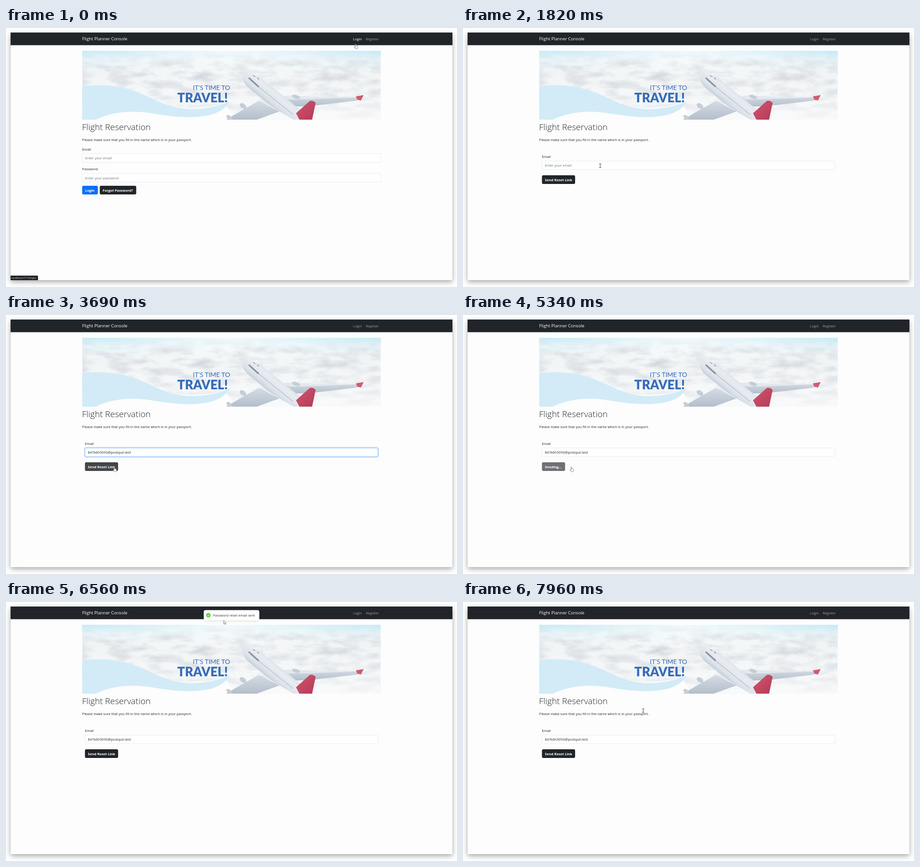
An HTML page that plays this animation: 986x568 px, repeating every 8 s.

```html
<!DOCTYPE html>
<html lang="en">
<head>
<meta charset="utf-8">
<title>Flight reservation</title>
<style>
html, body { margin: 0; width: 100%; height: 100%; overflow: hidden; background: #fff; }
.window { position: absolute; left: 10px; top: 10px; width: 966px; height: 543px; background: #fdfdfd; box-shadow: 0 4px 11px rgba(0,0,0,.34), 0 0 2px rgba(0,0,0,.12); }
svg { position: absolute; left: 0; top: 0; width: 986px; height: 568px; }
text { font: 7.6px "Open Sans", "Noto Sans", sans-serif; fill: #212529; white-space: pre; }
.brand { font-size: 9.5px; fill: #fff; }
.title { font-size: 18.9px; font-weight: 300; }
.hint { fill: #6c7277; }
.status { font-size: 5.76px; fill: #d6d7d9; }
.bold { font-weight: 700; fill: #fff; }
.slogan { font-family: Lato, sans-serif; fill: #356cb9; }
.field { fill: #fff; stroke: #dee2e6; stroke-width: .7; }
.dark { fill: #212529; }
.anim { animation: 8s step-end infinite; }

/* Pages */
#login { animation-name: login; }
@keyframes login { 0% { opacity: 1 } 15.9%, to { opacity: 0 } }
#forgot { animation-name: forgot; }
@keyframes forgot { 0% { opacity: 0 } 15.9%, to { opacity: 1 } }
#nav { animation-name: nav; animation-timing-function: linear; }
@keyframes nav { 0%, 15.9% { fill-opacity: 1 } 17.8%, to { fill-opacity: .55 } }
#forgotBtn { animation-name: forgotBtn; animation-timing-function: linear; }
@keyframes forgotBtn { 0%, 10.4% { fill: #212529 } 12.6%, to { fill: #424649 } }

/* Link bubble */
#tipLogin { animation-name: tipLogin; }
@keyframes tipLogin { 0% { opacity: 1 } 9.9%, to { opacity: 0 } }
#tipForgot { animation-name: tipForgot; animation-timing-function: linear; }
@keyframes tipForgot { 0%, 9.89% { opacity: 0 } 9.9%, 17.5% { opacity: 1 } 19.5%, to { opacity: 0 } }

/* Email field */
#focus { animation-name: focus; animation-timing-function: linear; }
@keyframes focus { 0%, 23.2% { opacity: 0 } 25%, 46.9% { opacity: 1 } 48.6%, to { opacity: 0 } }
#hint { animation-name: hint; }
@keyframes hint { 0% { opacity: 1 } 33.6%, to { opacity: 0 } }
#email { animation-name: email; }
@keyframes email { 0% { opacity: 0 } 33.6%, to { opacity: 1 } }
#caretA { animation-name: caretA; }
@keyframes caretA { 0% { opacity: 0 } 24% { opacity: 1 } 30.2%, to { opacity: 0 } }
#caretB { animation-name: caretB; }
@keyframes caretB { 0% { opacity: 0 } 33.6% { opacity: 1 } 39.8%, to { opacity: 0 } }

/* Send button */
#send { animation-name: send; }
@keyframes send { 0% { opacity: 1 } 47% { opacity: 0 } 67.6%, to { opacity: 1 } }
#sending { animation-name: sending; }
@keyframes sending { 0% { opacity: 0 } 47% { opacity: .65 } 67.6%, to { opacity: 0 } }
#sendBtn { animation-name: sendBtn; animation-timing-function: linear; }
@keyframes sendBtn { 0%, 42.2% { fill: #212529 } 44.1%, 75.6% { fill: #424649 } 77.5%, to { fill: #212529 } }

/* Toast */
#toast, #badge { transform-box: fill-box; transform-origin: center; }
#toast { animation-name: toast; filter: drop-shadow(0 1.5px 3px rgba(0,0,0,.13)); }
@keyframes toast {
  0% { opacity: 0; transform: translateY(-44px) scale(.6) }
  67.7% { opacity: .5; transform: translateY(-44px) scale(.6); animation-timing-function: cubic-bezier(.21,1.02,.73,1) }
  72.1% { opacity: 1; transform: none }
  92.7% { opacity: 1; transform: none; animation-timing-function: cubic-bezier(.06,.71,.55,1) }
  96%, to { opacity: 0; transform: translateY(-33px) scale(.6) }
}
#badge { animation-name: badge; }
@keyframes badge {
  0% { transform: scale(0) rotate(45deg) }
  68.4% { transform: scale(0) rotate(45deg); animation-timing-function: cubic-bezier(.175,.885,.32,1.275) }
  71.6%, to { transform: none }
}
#tick { stroke-dasharray: 8; animation-name: tick; animation-timing-function: ease-out; }
@keyframes tick { 0%, 70.4% { stroke-dashoffset: 8 } 72.8%, to { stroke-dashoffset: 0 } }

/* Pointer */
#pointer { animation-name: move; animation-timing-function: ease-in-out; }
@keyframes move {
  0%, .7% { transform: translate(764.3px,34.7px) }
  9.9%, 14.6% { transform: translate(245.5px,352.6px) }
  20.3% { transform: translate(289px,300px) }
  22%, 27.2% { transform: translate(300px,302px) }
  31% { transform: translate(365px,347px) }
  35.9%, 39.4% { transform: translate(264px,331px) }
  44.5%, 74.8% { transform: translate(236.8px,333px) }
  77% { transform: translate(252px,362px) }
  81.8% { transform: translate(475.8px,40.4px) }
  83.8%, 85.2% { transform: translate(477px,48.5px) }
  88.2% { transform: translate(397px,243px); animation-timing-function: step-end }
  99.4%, to { transform: translate(394px,238.3px) }
}
#hand { animation-name: hand; }
@keyframes hand { 0% { opacity: 1 } 1.8% { opacity: 0 } 9.7% { opacity: 1 } 16% { opacity: 0 } 41.8% { opacity: 1 } 76%, to { opacity: 0 } }
#arrow { animation-name: arrow; }
@keyframes arrow { 0% { opacity: 0 } 1.8% { opacity: 1 } 9.7% { opacity: 0 } 16% { opacity: 1 } 19.4% { opacity: 0 } 28.6% { opacity: 1 } 41.8% { opacity: 0 } 76% { opacity: 1 } 87.2%, to { opacity: 0 } }
#beam { animation-name: beam; }
@keyframes beam { 0% { opacity: 0 } 19.4% { opacity: 1 } 28.6% { opacity: 0 } 87.2%, to { opacity: 1 } }
</style>
</head>
<body>
<div class="window"></div>

<!-- Banner -->
<svg viewBox="0 0 986 568">
  <defs>
    <linearGradient id="sky" x2="0" y2="1">
      <stop stop-color="#c6eaf6"/><stop offset=".12" stop-color="#e6f4f8"/><stop offset=".3" stop-color="#f1f4f5"/><stop offset="1" stop-color="#f9fafb"/>
    </linearGradient>
    <radialGradient id="sun" cx=".5" cy="0" r=".5">
      <stop stop-color="#fff" stop-opacity=".75"/><stop offset="1" stop-color="#fff" stop-opacity="0"/>
    </radialGradient>
    <linearGradient id="fade" x2="0" y2="1">
      <stop stop-color="#fff" stop-opacity="0"/><stop offset=".25" stop-color="#fff"/><stop offset=".65" stop-color="#fff" stop-opacity=".8"/><stop offset="1" stop-color="#fff" stop-opacity=".1"/>
    </linearGradient>
    <linearGradient id="body" gradientUnits="userSpaceOnUse" x1="594" y1="132" x2="566" y2="166">
      <stop stop-color="#d9dfe6"/><stop offset=".3" stop-color="#e8ecf1"/><stop offset=".7" stop-color="#dde3ea"/><stop offset="1" stop-color="#bcc6d1"/>
    </linearGradient>
    <linearGradient id="wing" x2="0" y2="1">
      <stop stop-color="#d5dce4"/><stop offset="1" stop-color="#b3bfcb"/>
    </linearGradient>
    <linearGradient id="fin" x2="1" y2="1">
      <stop stop-color="#d0566f"/><stop offset="1" stop-color="#b53a56"/>
    </linearGradient>
    <filter id="cloud" x="0" y="0" width="1" height="1" color-interpolation-filters="sRGB">
      <feTurbulence type="fractalNoise" baseFrequency=".022 .06" numOctaves="4" seed="8"/>
      <feColorMatrix values="0 0 0 0 .78  0 0 0 0 .8  0 0 0 0 .83  1.5 0 0 0 -.58"/>
    </filter>
    <mask id="haze"><rect x="167" y="50" width="652" height="151" fill="url(#fade)"/></mask>
    <clipPath id="frame"><rect x="166.5" y="50" width="653" height="151"/></clipPath>
  </defs>
  <g clip-path="url(#frame)">
    <rect x="166" y="50" width="654" height="151" fill="url(#sky)"/>
    <rect x="166" y="50" width="654" height="151" fill="url(#sun)"/>
    <g mask="url(#haze)"><rect x="166" y="50" width="654" height="151" filter="url(#cloud)"/></g>
    <path fill="#fff" fill-opacity=".75" d="M166 128C220 120 270 130 318 154S395 180 480 168L500 201H166Z"/>
    <path fill="#d2ebf7" d="M166 128C220 120 270 130 318 154S400 182 448 174Q474 169 489 161Q479 180 452 189C408 201 360 194 318 187S235 183 196 201H166Z"/>
    <text class="slogan" x="408.5" y="135.5" style="font-size:14px">IT’S TIME TO</text>
    <text class="slogan" x="374.5" y="162.5" style="font-size:27.5px;font-weight:900">TRAVEL!</text>

    <!-- Plane -->
    <path fill="url(#wing)" d="M598 150C625 147 650 150 690 152L768 152L775 156L768 159L700 167Q650 174 626 171Z"/>
    <path fill="#e3e8ed" d="M598 150C625 147 650 150 690 152L768 152Q690 156 620 157Z"/>
    <path fill="url(#wing)" d="M553 160L522 177L481 201H548L598 183Z"/>
    <g fill="#c5cdd6"><ellipse cx="518" cy="171" rx="8" ry="5" transform="rotate(35 518 171)"/><ellipse cx="488" cy="196" rx="7" ry="4" transform="rotate(35 488 196)"/><ellipse cx="634" cy="151" rx="9" ry="4" transform="rotate(20 634 151)"/></g>
    <path fill="url(#body)" d="M517 108C517 101 526 99 537 101Q553 105 568 118L622 162L672 202H630L579 171L530 131Q518 120 517 108Z"/>
    <path fill="#596674" d="M529 110L532 108L554 128L551 130Z" opacity=".6"/>
    <path fill="none" stroke="#697684" stroke-width="1.2" stroke-dasharray="1.2 1.8" d="M535 115L628 190"/>
    <path fill="none" stroke="#77838f" stroke-width="1.1" d="M540 104L545 107M549 109L553 113"/>
    <path fill="url(#fin)" d="M634 187L663 161Q669 157 677 164L669 202H642Z"/>
    <path fill="#cf5c70" d="M765 150L782 147L776 159L768 157Z"/>
  </g>
</svg>

<!-- Page -->
<svg viewBox="0 0 986 568">
  <defs><clipPath id="view"><rect x="10" y="10" width="966" height="543"/></clipPath></defs>
  <g clip-path="url(#view)">
    <rect class="dark" x="10" y="10" width="966" height="27.7"/>
    <text class="brand" x="166.5" y="27.4">Flight Planner Console</text>
    <text class="anim" id="nav" x="758.7" y="26.8" style="fill:#fff">Login</text>
    <text x="786.4" y="26.8" style="fill:#fff;fill-opacity:.55">Register</text>
    <text class="title" x="166.3" y="224">Flight Reservation</text>
    <text x="166.6" y="248.3">Please make sure that you fill in the name which is in your passport.</text>

    <g class="anim" id="login">
      <text x="166.6" y="268.6">Email</text>
      <rect class="field" x="166.8" y="275.7" width="652.4" height="18.8" rx="3"/>
      <text class="hint" x="173" y="288.2">Enter your email</text>
      <text x="166.6" y="312">Password</text>
      <rect class="field" x="166.8" y="319.1" width="652.4" height="18.6" rx="3"/>
      <text class="hint" x="173" y="331.5">Enter your password</text>
      <rect x="166.5" y="346" width="34.3" height="19" rx="3" fill="#0d6efd"/>
      <text class="bold" x="173" y="358.6">Login</text>
      <rect class="dark anim" id="forgotBtn" x="205" y="346" width="79.7" height="19" rx="3"/>
      <text class="bold" x="211.3" y="358.6">Forgot Password?</text>
    </g>

    <g class="anim" id="forgot">
      <text x="172.6" y="284.8">Email</text>
      <rect class="field" x="172.8" y="291.8" width="640.2" height="18.8" rx="3"/>
      <g class="anim" id="focus">
        <rect x="171.6" y="290.6" width="642.6" height="21.2" rx="4" fill="none" stroke="#c2dbfe" stroke-width="2"/>
        <rect x="172.8" y="291.8" width="640.2" height="18.8" rx="3" fill="#fff" stroke="#86b7fe" stroke-width=".8"/>
      </g>
      <text class="hint anim" id="hint" x="179" y="304.3">Enter your email</text>
      <text class="anim" id="email" x="179" y="304.3">847k6h5093@postquil.test</text>
      <rect class="dark anim" id="caretA" x="179" y="296.5" width=".6" height="9.5"/>
      <rect class="dark anim" id="caretB" x="283" y="296.5" width=".6" height="9.5"/>
      <g class="anim" id="send">
        <rect class="dark anim" id="sendBtn" x="172.6" y="323" width="72.5" height="18.9" rx="3"/>
        <text class="bold" x="179" y="335.5">Send Reset Link</text>
      </g>
      <g class="anim" id="sending">
        <rect class="dark" x="172.6" y="323" width="50.6" height="18.9" rx="3"/>
        <text class="bold" x="179" y="335.5">Sending...</text>
      </g>
    </g>

    <g class="anim" id="tipLogin">
      <path fill="#212226" d="M10 543H68Q70 543 70 545V553H10Z"/>
      <text class="status" x="12" y="550.2">localhost:5173/login</text>
    </g>
    <g class="anim" id="tipForgot">
      <path fill="#212226" d="M10 543H98.5Q100.5 543 100.5 545V553H10Z"/>
      <text class="status" x="12" y="550.2">localhost:5173/forgot-password</text>
    </g>

    <g class="anim" id="toast">
      <rect x="432.3" y="17.7" width="121.5" height="22.5" rx="4" fill="#fff"/>
      <g class="anim" id="badge">
        <circle cx="442.5" cy="29" r="5" fill="#61d345"/>
        <path class="anim" id="tick" d="M440.3 29.3L441.9 30.9L444.8 27.3" fill="none" stroke="#fff"/>
      </g>
      <text x="452.4" y="32" style="font-size:7.55px;fill:#363636">Password reset email sent</text>
    </g>

    <g class="anim" id="pointer" stroke-linejoin="round" stroke-linecap="round">
      <path class="anim" id="hand" fill="#fff" stroke="#4a4a4a" stroke-width=".65" d="M-.8 .8Q0-.2.8.8V4L2 4.1Q3.3 4 3.6 4.7Q4.7 4.6 4.8 5.5V8Q4.7 9.4 3.9 10.7H-.3Q-1.2 9.3-2.9 7.3Q-3.3 6.1-2.1 6.2L-.8 7.2Z"/>
      <path class="anim" id="arrow" fill="#fff" stroke="#4a4a4a" stroke-width=".65" d="M0 0V7.5L1.8 5.9L3 8.7L4.2 8.2L3 5.5H5.4Z"/>
      <path class="anim" id="beam" fill="none" stroke="#333" stroke-width=".9" d="M-2.2-4H-.6L0-3.6L.6-4H2.2M0-3.6V3.6M-2.2 4H-.6L0 3.6L.6 4H2.2"/>
    </g>
  </g>
</svg>
</body>
</html>
```
